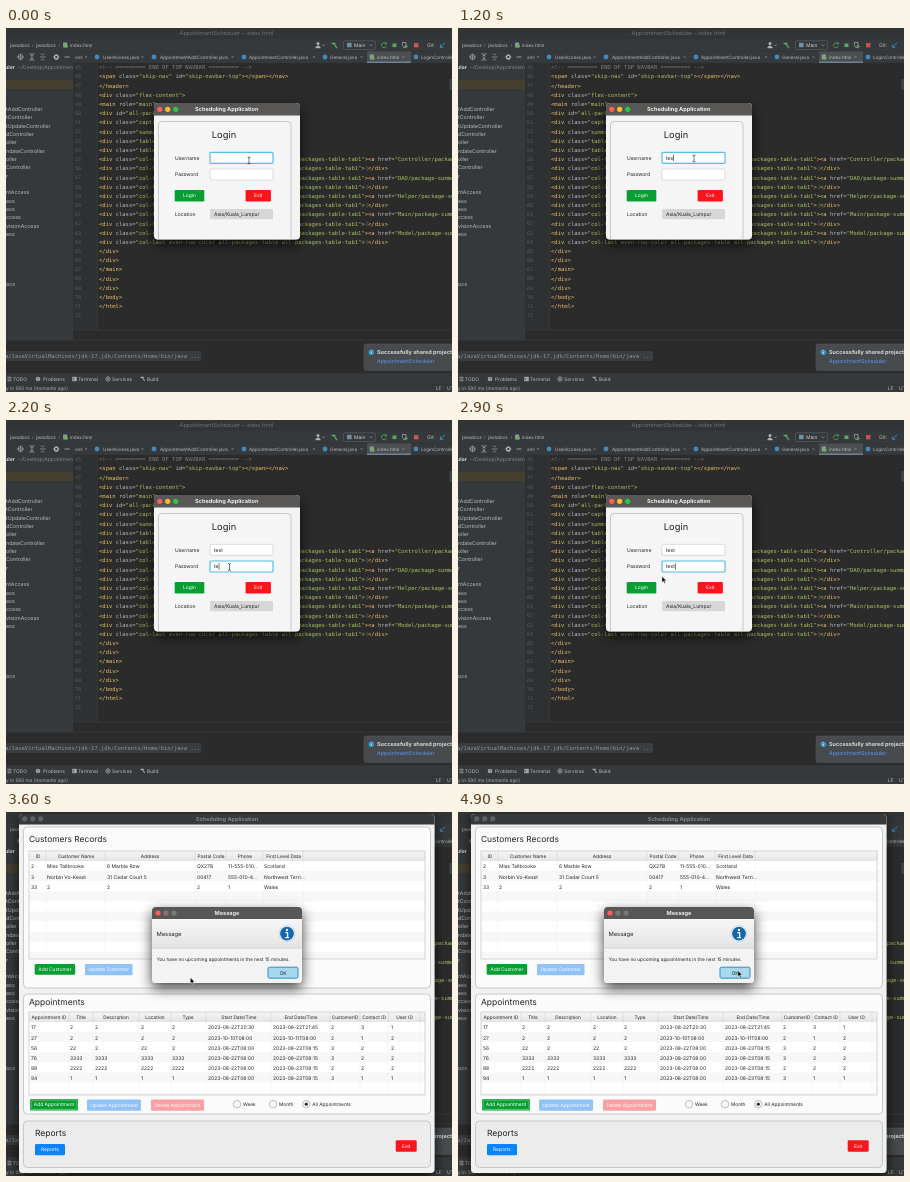
Recreate the animation shown at these times as an HTML page. Size 446 px wide and 364 px high, loop 5 s.

```html
<!DOCTYPE html>
<html lang="en">
<head>
<meta charset="utf-8">
<title>Scheduling Application</title>
<style>
html, body { margin: 0; width: 100%; height: 100%; overflow: hidden; background: #2b2b2b; }
svg { display: block; width: 446px; height: 364px; }
text { font-family: Inter, "Open Sans", sans-serif; white-space: pre; text-rendering: geometricPrecision; }
.mono { font-family: "DejaVu Sans Mono", "Liberation Mono", monospace; }
</style>
</head>
<body>
<svg id="stage" viewBox="0 0 446 364" xmlns="http://www.w3.org/2000/svg"></svg>
<script>
const esc = s => String(s).replace(/&/g, '&amp;').replace(/</g, '&lt;').replace(/>/g, '&gt;');
const rect = (x, y, w, h, fill, more = '') =>
  `<rect x="${x}" y="${y}" width="${w}" height="${h}" fill="${fill}" ${more}/>`;
const dot = (x, y, r, fill, more = '') => `<circle cx="${x}" cy="${y}" r="${r}" fill="${fill}" ${more}/>`;
const path = (d, stroke, width = 0.8, fill = 'none') =>
  `<path d="${d}" stroke="${stroke}" stroke-width="${width}" fill="${fill}"/>`;
// y is the middle of the line of text
const rawText = (x, y, inner, size, fill, more = '') =>
  `<text x="${x}" y="${(y + size * 0.36).toFixed(2)}" font-size="${size}" fill="${fill}" ${more}>${inner}</text>`;
const text = (x, y, s, size = 5, fill = '#222', more = '') => rawText(x, y, esc(s), size, fill, more);
const mid = (x, y, s, size, fill, more = '') => text(x, y, s, size, fill, 'text-anchor="middle" ' + more);
const group = (id, inner, more = '') => `<g id="${id}" ${more}>${inner}</g>`;

const GREEN = '#079f32', RED = '#f9151b', CHROME = '#36393b', EDITOR = '#2b2b2b', TITLE = '#585756', MONO = 5.53;

function button(x, y, w, h, label, fill, color = '#fff') {
  return rect(x, y, w, h, fill, 'rx="1.2"') + mid(x + w / 2, y + h / 2, label, 4.9, color);
}

function lights(x, y, colors, step = 8) {
  return colors.map((c, i) => dot(x + i * step, y, 2.6, c)).join('');
}

// ---------- code editor ----------
function highlight(line) {
  const span = (s, c) => `<tspan fill="${c}">${esc(s)}</tspan>`;
  if (line.startsWith('<!--')) return span(line, '#808080');
  return line.replace(/(<\/?\w+|>)|([\w-]+=)|("[^"]*"?)|([^<>"\w]+)/g,
    (m, tag, attr, str) => span(m, tag ? '#e8bf6a' : attr ? '#bababa' : str ? '#a5c261' : '#a9b7c6'));
}

function codeLines() {
  const cell = side => `<div class="col-${side} even-row-color all-packages-table all-packages-table-tab1">`;
  const lines = ['<!-- ========= END OF TOP NAVBAR ========= -->',
    '<span class="skip-nav" id="skip-navbar-top"></span></nav>', '</header>',
    '<div class="flex-content">', '<main role="main">',
    '<div id="all-packages-table">', '<div class="caption"><span>Packages</span></div>',
    '<div class="summary-table two-column-summary">',
    '<div class="table-header col-first">Package</div>',
    '<div class="table-header col-last">Description</div>'];
  for (const name of ['Controller', 'DAO', 'Helper', 'Main', 'Model'])
    lines.push(`${cell('first')}<a href="${name}/package-summary.html">`, `${cell('last')} </div>`);
  return lines.concat('</div>', '</div>', '</main>', '</div>', '</div>', '</body>', '</html>', '');
}

function editor() {
  let out = rect(67, 35, 379, 277, EDITOR) + rect(67, 35, 24, 267, '#2e3031') +
    path('M91.3 35V302', '#45474a', 0.5);
  codeLines().forEach((line, i) => {
    const y = 39.3 + i * 9.19;
    out += text(69, y, 45 + i, 5, '#5b5f63', 'class="mono"') +
      rawText(93, y, highlight(line), MONO, '#a9b7c6', 'class="mono"');
    if (line.includes('col-last even')) out += rect(360.1, y - 2.4, 2.2, 5.2, '#3d403b');
  });
  return out + rect(443.5, 51, 2.5, 11, '#414446');
}

function pageIcon(x, y) {
  return rect(x - 2.2, y - 2.5, 4, 5, '#8d9aa3') + dot(x + 1, y + 1, 1.7, '#62b543');
}

function toolbar() {
  const c = '#afb1b3', green = '#59a869';
  let out = rect(0, 0, 446, 12, '#333436') + rect(0, 11, 446, 24, CHROME) +
    mid(220.5, 5, 'AppointmentScheduler – index.html', 5.6, '#717375') +
    path('M0 23.2H446 M0 34.9H446', '#2f3133', 0.6) +
    text(-2, 17, 'r', 5, '#bbb') + text(4, 17, 'javadocs', 4.7, '#bbb') +
    text(25.8, 17, '›', 5, '#888') + text(30, 17, 'javadocs', 4.7, '#bbb') +
    text(52.5, 17, '›', 5, '#888') + pageIcon(59.3, 17) +
    text(64, 17, 'index.html', 4.6, '#bbb');
  out += dot(312, 15.6, 1.5, c) + path('M309.3 20Q312 15.4 314.7 20Z', c, 0.4, c) +
    path('M316 16.5l1.3 1.4 1.3-1.4', c, 0.6) +
    path('M325.5 15.5h4M328 16.2l3 4', green, 1.3) +
    rect(337.5, 12.8, 32, 8.8, CHROME, 'rx="1.2" stroke="#5e6163" stroke-width=".6"') +
    rect(341, 14.8, 4.6, 4.4, '#6f8fa5') + text(348, 17.2, 'Main', 5, '#ccc') +
    path('M363.5 16.4l1.5 1.5 1.5-1.5', c, 0.6) +
    path('M380 15.6A2.5 2.5 0 1 0 380.4 18.2M380.4 14.2v1.8h-1.8', green, 0.8) +
    dot(388.5, 17.3, 2, green) + path('M385.9 15.5l5.2 3.6M391.1 15.5l-5.2 3.6', green, 0.5) +
    path('M396.4 14.5h3.6v3l-1.8 2.4-1.8-2.4z', c, 0.7) + path('M399 16.8l3 1.8-3 1.8z', green, 0.2, green) +
    rect(408, 15, 4.4, 4.4, '#c75450') + text(421, 17.2, 'Git:', 5, '#bbb') +
    path('M434.4 19.3l4.6-4.4M434.4 16.5v2.8h2.8', '#3592c4', 0.9);
  const tabs = [[91, 97, 'UserAccess.java', 136.5], [148, 154, 'AppointmentAddController.java', 226.5],
    [238, 243, 'AppointmentController.java', 308], [319, 324, 'General.java', 355.5],
    [366, 371, 'index.html', 397.5], [410, 415, 'LoginController.java', 480]];
  out += rect(361, 23.3, 44, 11.4, '#4b4f52') + rect(361, 33.6, 44, 1.3, '#6e8ca0');
  for (const [ix, tx, label, close] of tabs) {
    out += (label === 'index.html' ? pageIcon(ix, 29) : dot(ix, 29, 2.4, '#4589b8')) +
      text(tx, 29, label, 4.6, '#bbb') +
      path(`M${close - 1} 28l2 2m0-2l-2 2`, '#8b8e90', 0.5);
  }
  out += rect(0, 23.5, 67, 11.3, CHROME) +
    dot(14.5, 29, 2.5, 'none', `stroke="${c}" stroke-width=".7"`) + path('M14.5 25.7v6.6M11.2 29h6.6', c, 0.6) +
    path('M23.2 26h5.4M23.2 32h5.4M25.9 27v4M24.6 28.2l1.3-1.3 1.3 1.3M24.6 29.8l1.3 1.3 1.3-1.3', c, 0.65) +
    path('M34 29h5.4M35.4 25.6l1.3 1.5 1.3-1.5M35.4 32.4l1.3-1.5 1.3 1.5', c, 0.65) +
    dot(50.3, 29, 1.9, 'none', `stroke="${c}" stroke-width="1.3"`) +
    path('M50.3 25.9v6.2M47.2 29h6.2', c, 0.7) + dot(50.3, 29, 0.9, CHROME) +
    path('M58.5 29h5', c, 0.8) +
    text(69, 29, 'xml', 4.6, '#bbb') + path('M79 28l2 2m0-2l-2 2', '#8b8e90', 0.5);
  return out;
}

function projectTree() {
  const names = ['tAddController', 'tController', 'tUpdateController', 'dController', 'oller', 'ndateController',
    'oller', 'Controller', 'r', '', 'ntAccess', 'ess', 'ess', 'ccess', 'visionAccess', 'ess', '', '', '', '', '', 'ocs'];
  return rect(0, 35, 67, 277, CHROME) + rect(0, 52, 67, 9, '#45402f') +
    `<svg width="67" height="302">${text(-1, 39.3, 'uler', 5.2, '#d0d0d0', 'font-weight="700"') +
      text(12, 39.3, '~/Desktop/AppointmentScheduler', 5, '#85888a')}</svg>` +
    names.map((n, i) => text(0, 81 + i * 8.33, n, 5.3, '#bbb')).join('');
}

function bottomPanels() {
  const tools = [[7, 'TODO'], [37, 'Problems'], [72, 'Terminal'], [106, 'Services'], [141, 'Build']];
  const c = '#a4a6a8';
  return rect(0, 312, 446, 33, EDITOR) + path('M67 302H446M0 312H446', '#3a3d3f', 0.7) +
    rect(0, 323, 195, 10, '#3a3d3f') +
    text(-1, 328, 'a/JavaVirtualMachines/jdk-17.jdk/Contents/Home/bin/java ...', 5.5, '#8d969e', 'class="mono"') +
    rect(0, 345, 446, 19, CHROME) + path('M0 345H446M0 356.5H446', '#2f3133', 0.6) +
    tools.map(([x, s]) => text(x, 351, s, 4.9, '#bbb')).join('') +
    path('M1.5 349.3h4M1.5 351h4M1.5 352.7h4', c) +
    dot(32, 351, 2.3, c) + path('M32 349.5v1.8M32 352v.7', CHROME, 0.7) +
    rect(66.2, 348.8, 4.6, 4.4, c) + path('M67 350l1.2 1-1.2 1', CHROME, 0.6) +
    dot(102, 351, 2.2, 'none', `stroke="${c}" stroke-width=".8"`) + path('M101.4 349.8l1.9 1.2-1.9 1.2z', c, 0.2, c) +
    path('M134.5 349.4h3.4M136.4 350l2.4 3', c, 1.1) +
    text(0, 360.2, 'y in 580 ms (moments ago)', 4.8, '#aaa') +
    text(430, 360.2, 'LF', 4.9, '#bbb') + text(441, 360.2, 'UTF-8', 4.9, '#bbb') +
    rect(358, 316, 92, 26.5, '#474b4d', 'rx="2" stroke="#55595b" stroke-width=".5"') +
    dot(365.3, 324.2, 2.8, '#3592c4') + path('M365.3 323.8v2M365.3 322.3v.8', '#fff', 0.8) +
    text(371, 324.3, 'Successfully shared project on', 5.5, '#d8d8d8', 'font-weight="700"') +
    text(371, 333, 'AppointmentScheduler', 5.3, '#589df6');
}

// ---------- login window ----------
const FIELD = { x: 204, w: 63, h: 11, user: 124.3, pass: 141 };

function field(id, y) {
  return rect(FIELD.x, y, FIELD.w, FIELD.h, '#fff', `id="${id}Box" rx="1"`) +
    text(208, y + 5.6, '', 5, '#222', `id="${id}"`);
}

function loginWindow() {
  return rect(148, 75, 146, 136.5, '#f3f3f3', 'rx="4" filter="url(#shadow)"') +
    `<path d="M148 87.5V79a4 4 0 0 1 4-4H290a4 4 0 0 1 4 4V87.5Z" fill="${TITLE}"/>` +
    lights(153.7, 81.3, ['#fe5f57', '#febc2e', '#28c840']) +
    mid(220.7, 81, 'Scheduling Application', 5.6, '#eee', 'font-weight="700"') +
    path('M152.5 211V97a3.5 3.5 0 0 1 3.5-3.5H281.5a3.5 3.5 0 0 1 3.5 3.5V211', '#c3c3c3', 0.9, '#f5f5f5') +
    mid(218, 107, 'Login', 9.3, '#222') +
    text(169, 130, 'Username') + text(169, 146.5, 'Password') + text(169, 186, 'Location') +
    field('user', FIELD.user) + field('pass', FIELD.pass) +
    rect(204, 181, 63, 10.3, '#d7d7d7', 'rx="1"') + text(208, 186.2, 'Asia/Kuala_Lumpur') +
    button(168.7, 162, 29.6, 11.4, 'Login', GREEN) + button(239.6, 162, 25.3, 11.4, 'Exit', RED) +
    rect(0, 0, 0.6, 6.6, '#222', 'id="caret"');
}

// ---------- records window ----------
function table({ x, y, w, h, edges, heads, cells, rows }) {
  let out = rect(x, y, w, h, '#fff');
  for (let i = 0; y + 10 + i * 10.1 < y + h - 0.5; i++) {
    const top = y + 10 + i * 10.1;
    out += rect(x, top, w, Math.min(10.1, y + h - top), i % 2 ? '#f7f7f7' : '#fff');
  }
  out += edges.map(e => path(`M${e} ${y}V${y + h}`, '#ededed', 0.5)).join('') +
    rect(x, y, w, 10, 'url(#head)') +
    edges.map(e => path(`M${e} ${y}v10`, '#c9c9c9', 0.5)).join('') +
    heads.map(([c, s]) => mid(c, y + 5.3, s, 4.75, '#222')).join('');
  rows.forEach((row, r) => row.split('|').forEach((s, i) => {
    out += text(cells[i], y + 15.6 + r * 10.1, s, 5);
  }));
  return out + rect(x, y, w, h, 'none', 'stroke="#c4c4c4" stroke-width=".7"');
}

const panel = (y, h, fill) => rect(17.5, y, 407, h, fill, 'rx="4" stroke="#bdbdbd" stroke-width=".8"');

function radio(x, label, on) {
  return dot(x, 292.2, 3.7, '#fafafa', 'stroke="#a0a0a0" stroke-width=".7"') +
    (on ? dot(x, 292.2, 1.6, '#333') : '') + text(x + 6, 292.2, label, 4.8);
}

function recordsWindow() {
  const customers = {
    x: 23, y: 39, w: 396, h: 108, edges: [40, 99, 189, 220, 257, 297],
    heads: [[32, 'ID'], [70, 'Customer Name'], [144, 'Address'], [205, 'Postal Code'], [239, 'Phone'], [277.5, 'First Level Data']],
    cells: [25, 41, 101, 191, 222, 258],
    rows: ['2|Miss Tallbrooke|6 Marble Row|QX27B|11-555-010...|Scotland',
      '3|Norbin Vo-Kesst|31 Cedar Court 5|00417|555-010-4...|Northwest Terri...', '33|2|2|2|1|Wales']
  };
  const aug = '2023-08-22T08:00|2023-08-23T08:15';
  const appointments = {
    x: 23, y: 200, w: 396, h: 83, edges: [63, 87, 133, 165, 200, 265, 324, 354, 382, 414],
    heads: [[43, 'Appointment ID'], [75, 'Title'], [110, 'Description'], [149, 'Location'], [182, 'Type'],
      [233, 'Start Date/Time'], [295, 'End Date/Time'], [339, 'CustomerID'], [368, 'Contact ID'], [398.5, 'User ID']],
    cells: [25, 64, 89, 135, 166, 202, 267, 325, 355, 385],
    rows: ['17|2|2|2|2|2023-08-22T20:30|2023-08-22T21:45|2|3|1', '27|2|2|2|2|2023-10-10T08:00|2023-10-11T08:00|2|1|2',
      `56|22|2|22|2|${aug}|3|2|2`, `76|3333|3333|3333|3333|${aug}|3|2|2`,
      `88|2222|2222|2222|2222|${aug}|2|2|2`, `94|1|1|1|1|${aug}|3|1|1`]
  };
  return rect(13, 2, 415.5, 359, '#f1f1f1', 'rx="4" filter="url(#shadow)"') +
    '<path d="M13 12.5V6a4 4 0 0 1 4-4H424.5a4 4 0 0 1 4 4V12.5Z" fill="#38393b"/>' +
    lights(18.7, 6.8, ['#5f6163', '#5f6163', '#5f6163']) +
    mid(221, 6.6, 'Scheduling Application', 5.5, '#858789', 'font-weight="700"') +
    panel(15, 161, '#fbfbfb') + text(23, 27, 'Customers Records', 8.4) + table(customers) +
    button(28.7, 152, 40.5, 10.8, 'Add Customer', GREEN) +
    button(79, 152, 47.5, 11.3, 'Update Customer', '#90c2f8') +
    panel(182, 120, '#fbfbfb') + text(23, 190, 'Appointments', 8.5) + table(appointments) +
    button(24, 287, 48, 11.4, 'Add Appointment', GREEN) +
    rect(25, 288, 46, 9.4, 'none', 'rx="1" stroke="#9fdcae" stroke-width=".6"') +
    button(81, 287.5, 54, 11.2, 'Update Appointment', '#90c2f8') +
    button(145, 287.5, 53, 11.2, 'Delete Appointment', '#f9a0a2') +
    radio(231, 'Week') + radio(267, 'Month') + radio(300.3, 'All Appointments', true) +
    panel(309, 46.5, '#ececec') + text(29, 321, 'Reports', 8.5) +
    button(29, 332, 30, 11.3, 'Reports', '#0b84fb') + button(389.7, 328.3, 21, 11.4, 'Exit', RED);
}

function messageBox() {
  return rect(146, 95, 150, 76, '#f3f3f3', 'rx="4" filter="url(#shadow)"') +
    `<path d="M146 107V99a4 4 0 0 1 4-4H292a4 4 0 0 1 4 4V107Z" fill="${TITLE}"/>` +
    lights(152, 101, ['#fe5f57', '#7b7978', '#7b7978']) +
    mid(221, 101, 'Message', 5.6, '#eee', 'font-weight="700"') +
    rect(146, 107, 150, 29, 'url(#head)') + path('M146 136H296', '#c4c4c4', 0.6) +
    text(150.5, 122, 'Message', 5.8) +
    dot(281, 121.6, 7.9, '#fff', 'stroke="#9bb0c4" stroke-width=".5"') + dot(281, 121.6, 6.9, '#1467ad') +
    dot(281, 118, 1.15, '#fff') + path('M279.4 120.7h2.2v4.8M279.2 125.6h4', '#fff', 1.3) +
    text(150.7, 147.3, 'You have no upcoming appointments in the next 15 minutes.', 4.72) +
    rect(262, 155.2, 30, 11, '#a8d8ee', 'rx="1.5" stroke="#2d8fc0" stroke-width="1"') +
    mid(277, 160.8, 'OK', 5, '#222');
}

// ---------- pointers, hot spot at the origin ----------
const pointers = {
  beam: path('M-1.5 -3.5Q0 -3.5 0 -2.4Q0 -3.5 1.5 -3.5M0 -2.8V2.8M-1.5 3.5Q0 3.5 0 2.4Q0 3.5 1.5 3.5', '#222', 0.6),
  arrow: path('M0 0V6.2L1.5 4.9L2.6 7.2L3.6 6.7L2.6 4.5H4.5Z', '#fff', 0.5, '#000'),
  hand: path('M-.6 .5Q0 -.6 .6 .5V2.2Q1.8 1.8 2 2.5Q3.2 2.3 3.2 3.3V4.7L2.6 6.3H-.8L-2.2 4Q-2 2.9 -.6 3.8Z', '#111', 0.8, '#eee')
};

const stage = document.getElementById('stage');
stage.innerHTML = `<defs>
  <filter id="shadow" x="-25%" y="-25%" width="150%" height="160%">
    <feDropShadow dx="0" dy="5" stdDeviation="6.5" flood-color="#000" flood-opacity=".75"/></filter>
  <linearGradient id="head" x1="0" y1="0" x2="0" y2="1">
    <stop offset="0" stop-color="#f6f6f6"/><stop offset="1" stop-color="#e4e4e4"/></linearGradient></defs>` +
  editor() + toolbar() + projectTree() + bottomPanels() +
  group('login', loginWindow()) + group('records', recordsWindow() + messageBox()) +
  Object.entries(pointers).map(([id, shape]) => group(id, shape)).join('');

const $ = id => document.getElementById(id);
const show = (id, on) => $(id).setAttribute('display', on ? 'inline' : 'none');

// ---------- motion ----------
const LOOP = 5000, STEP = 100, OPEN = 3600, TAB = 1900;
const keys = { user: [800, 1000, 1100, 1300], pass: [2000, 2200, 2300, 2500] };
const route = [[0, 243, 132.5], [300, 243, 132.5], [700, 236, 130.5], [1300, 236, 130.5], [1600, 223.5, 147],
  [2600, 223.5, 147], [3200, 184.3, 165.5], [3800, 184.3, 165.5], [4600, 279.8, 158.5], [LOOP, 279.8, 158.5]];

function pointerAt(t) {
  const i = route.findIndex(p => t < p[0]);
  const [t0, x0, y0] = route[i - 1], [t1, x1, y1] = route[i];
  const u = (t - t0) / (t1 - t0), k = u * u * (3 - 2 * u);
  return [x0 + (x1 - x0) * k, y0 + (y1 - y0) * k];
}

function pointerKind(t, x, y) {
  if (t >= OPEN) return 'arrow';
  const within = (l, top, w, h) => x >= l && x <= l + w && y >= top && y <= top + h;
  const overField = top => within(FIELD.x, top, FIELD.w, FIELD.h);
  if (overField(FIELD.user) || overField(FIELD.pass)) return 'beam';
  return within(168.7, 162, 29.6, 11.4) ? 'hand' : 'arrow';
}

function draw(t) {
  show('login', t < OPEN);
  show('records', t >= OPEN);
  const focus = t < TAB ? 'user' : 'pass';
  for (const id of ['user', 'pass']) {
    $(id).textContent = 'test'.slice(0, keys[id].filter(k => k <= t).length);
    $(id + 'Box').setAttribute('stroke', id === focus ? '#55bde6' : '#cfcfcf');
    $(id + 'Box').setAttribute('stroke-width', id === focus ? 1.2 : 0.7);
  }
  if (t < OPEN) {
    const last = Math.max(focus === 'user' ? -500 : TAB, ...keys[focus].filter(k => k <= t));
    const typed = $(focus).textContent ? $(focus).getComputedTextLength() : 0;
    $('caret').setAttribute('x', 208.2 + typed);
    $('caret').setAttribute('y', FIELD[focus] + 2.2);
    show('caret', Math.floor((t - last) / 500) % 2 === 0);
  }
  const [x, y] = pointerAt(t), kind = pointerKind(t, x, y);
  for (const id in pointers) show(id, id === kind);
  $(kind).setAttribute('transform', `translate(${x.toFixed(2)} ${y.toFixed(2)})`);
}

const start = performance.now();
function tick() {
  const t = (performance.now() - start) % LOOP;
  draw(Math.floor(t / STEP) * STEP);
  requestAnimationFrame(tick);
}
tick();
</script>
</body>
</html>
```
